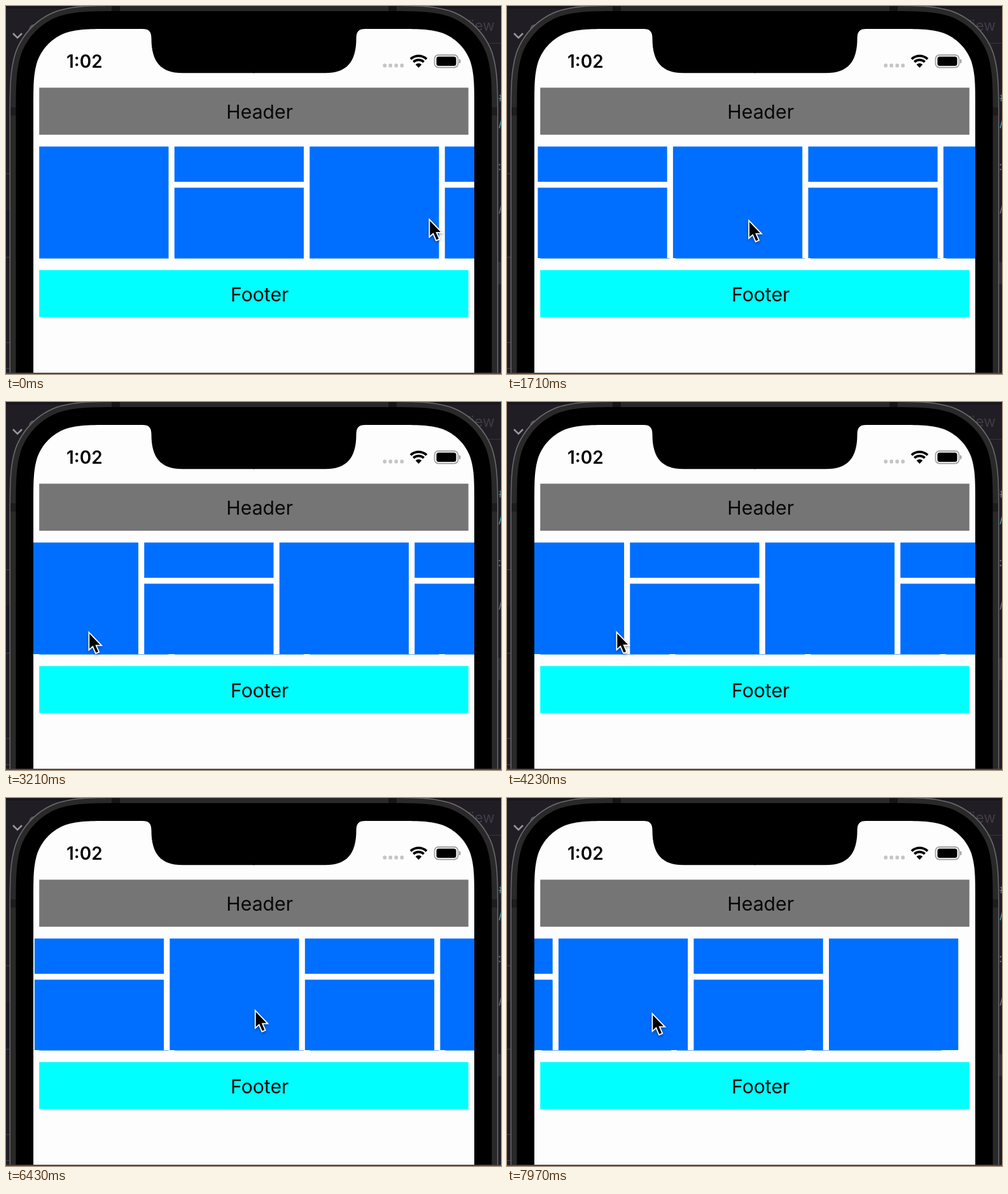
Write an HTML page with a canvas that moves like this. It is 778 px wide and 578 px high and loops after 7.99 s.

```html
<!DOCTYPE html>
<html lang="en">
<head>
<meta charset="utf-8">
<title>Scrolling grid</title>
<style>
  html, body { margin: 0; width: 100%; height: 100%; overflow: hidden; background: #201d25; }
  canvas { display: block; }
</style>
</head>
<body>
<canvas id="stage" width="778" height="578"></canvas>
<script>
const LOOP = 7990;
const BLUE = '#006fff', WHITE = '#fdfdfd', INK = '#080808';
const SANS = 'Inter, Roboto, sans-serif';
const ctx = document.getElementById('stage').getContext('2d');

// Layout in device points, stacked from the header down.
const PT = 693 / 375;
const SCREEN = { left: 43, right: 736, top: 36 };
const GAP = 5 * PT, BAR = 40 * PT, TILE = 110 * PT, COLUMNS = 7;
const LEFT = SCREEN.left + GAP;
const HEADER_TOP = 128.3;
const GRID_TOP = HEADER_TOP + BAR + 2 * GAP;
const GRID_BOTTOM = Math.floor(GRID_TOP + 95 * PT);
const FOOTER_TOP = GRID_TOP + 95 * PT + 2 * GAP;
const SCROLL_END = COLUMNS * (TILE + GAP) + GAP - (SCREEN.right - SCREEN.left);
const BOUNCE_AT = 7650, OVERSHOOT = 44, BOUNCE_DECAY = 348;

// Key poses: time, scroll, pointer x, pointer y
const poses = [
  [0, 0, 664.5, 333.5],
  [660, 0, 612, 331],
  [1110, 111.5, 488, 332],
  [2410, 328.2, 267.5, 342],
  [3210, 472.5, 129.5, 360],
  [3700, 496.5, 109, 366],
  [4050, 496.5, 109, 366],
  [4790, 496.5, 546, 324],
  [5310, 496.5, 573, 332],
  [5560, 496.5, 560, 332],
  [6430, 644.8, 391, 332],
  [BOUNCE_AT, SCROLL_END + OVERSHOOT, 227.5, 337]
];

// Monotone cubic through one column of the poses; holds stay flat.
function sample(time, c) {
  const last = poses.length - 1, t = Math.min(time, BOUNCE_AT);
  const slope = i => (poses[i + 1][c] - poses[i][c]) / (poses[i + 1][0] - poses[i][0]);
  const tangent = i => {
    if (i === 0 || i === last) return 0;
    const a = slope(i - 1), b = slope(i);
    return a * b > 0 ? 2 * a * b / (a + b) : 0;
  };
  let i = 0;
  while (i < last - 1 && t >= poses[i + 1][0]) i++;
  const d = poses[i + 1][0] - poses[i][0], u = (t - poses[i][0]) / d;
  const ease = u * u * (3 - 2 * u);
  return poses[i][c] * (1 - ease) + poses[i + 1][c] * ease
    + d * u * (1 - u) * (tangent(i) * (1 - u) - tangent(i + 1) * u);
}

function scrollAt(t) {
  if (t < BOUNCE_AT) return sample(t, 1);
  return SCROLL_END + OVERSHOOT * Math.exp((BOUNCE_AT - t) / BOUNCE_DECAY);
}

function rect(x, y, w, h, color) {
  ctx.fillStyle = color;
  ctx.fillRect(x, y, w, h);
}

function round(x, y, w, h, r, color) {
  ctx.beginPath();
  ctx.roundRect(x, y, w, h, r);
  ctx.fillStyle = color;
  ctx.fill();
}

function text(str, x, y, size, color, align = 'left', weight = 400) {
  ctx.font = `${weight} ${size}px ${SANS}`;
  ctx.textAlign = align;
  ctx.fillStyle = color;
  ctx.fillText(str, x, y);
}

// Slab running off the bottom, with continuous-curvature top corners.
function slab(left, right, top, r, color) {
  const corner = (x, s) => {
    const curve = (a, b, c, d, e, f) => ctx.bezierCurveTo(
      x + s * a * r, top + b * r, x + s * c * r, top + d * r, x + s * e * r, top + f * r);
    if (s > 0) {
      curve(0, 1.09, 0, 0.87, 0.075, 0.63);
      curve(0.17, 0.37, 0.37, 0.17, 0.63, 0.075);
      curve(0.87, 0, 1.09, 0, 1.53, 0);
    } else {
      curve(1.09, 0, 0.87, 0, 0.63, 0.075);
      curve(0.37, 0.17, 0.17, 0.37, 0.075, 0.63);
      curve(0, 0.87, 0, 1.09, 0, 1.53);
    }
  };
  ctx.beginPath();
  ctx.moveTo(left, 600);
  ctx.lineTo(left, top + 1.53 * r);
  corner(left, 1);
  ctx.lineTo(right - 1.53 * r, top);
  corner(right, -1);
  ctx.lineTo(right, 600);
  ctx.fillStyle = color;
  ctx.fill();
}

function drawDesktop() {
  rect(0, 0, 778, 578, '#201d25');
  rect(0, 0, 778, 4, '#19171c');
  rect(738, 58, 40, 1, '#38343c');
  rect(0, 320, 8, 74, '#1a1820');
  for (const y of [263, 394, 528, 569]) rect(0, y, 8, 1, '#454249');
  rect(770, 402, 8, 35, '#302d34');

  ctx.beginPath();
  ctx.moveTo(11, 43);
  ctx.lineTo(18, 50);
  ctx.lineTo(25, 43);
  ctx.strokeStyle = '#9a979d';
  ctx.lineWidth = 2.5;
  ctx.stroke();
  text('C', 35, 45, 22, '#5a5660');
  text('View', 768, 39, 23, '#403b45', 'right');
  text('#', 774, 150, 19, '#5f8580');
  text('/', 774, 190, 19, '#42a6ad');
  text(':', 773, 258, 19, '#77747a');
  text('/', 774, 324, 19, '#77747a');
}

function drawPhone() {
  slab(5.5, 773.5, -1.5, 118, '#6a6a6a');
  slab(7, 772, 0, 117, '#292929');
  for (const x of [166, 601]) rect(x, 0, 13, 8, '#151515');
  for (const x of [7, 763]) rect(x, 159, 9, 13, '#1d1d1d');
  slab(15.5, 763.5, 8, 108, '#000');
  slab(SCREEN.left, SCREEN.right, SCREEN.top, 44 * PT, WHITE);
  drawNotch();
  drawStatus();
  drawBar('Header', HEADER_TOP, '#757575');
  drawBar('Footer', FOOTER_TOP, '#00ffff');
  rect(0, 576, 778, 2, '#4a474c');
}

function drawBar(label, top, color) {
  rect(LEFT, top, SCREEN.right - GAP - LEFT, BAR, color);
  text(label, 398.7, top + 48.9, 30.2, INK, 'center');
}

function drawNotch() {
  const mid = 389.5;
  ctx.beginPath();
  for (const s of [-1, 1]) {
    ctx.moveTo(mid, 35);
    ctx.lineTo(mid + s * 175, 35);
    ctx.lineTo(mid + s * 175, 36);
    ctx.bezierCurveTo(mid + s * 165, 36, mid + s * 161, 40, mid + s * 161, 51);
    ctx.bezierCurveTo(mid + s * 161, 88, mid + s * 146, 105.3, mid + s * 112, 105.3);
    ctx.lineTo(mid, 105.3);
  }
  ctx.fillStyle = '#000';
  ctx.fill();
  rect(mid - 1, 35, 2, 70.3, '#000');
}

function drawStatus() {
  text('1:02', 95, 97, 28, INK, 'left', 600);
  for (let i = 0; i < 4; i++) round(592.5 + i * 9, 90.5, 5.5, 6, 2, '#c5c5c5');

  // Wi-Fi fan
  const up = Math.PI * 1.5, half = 0.76;
  ctx.strokeStyle = ctx.fillStyle = '#000';
  ctx.lineWidth = 3.8;
  for (const r of [18.2, 11.8]) {
    ctx.beginPath();
    ctx.arc(648.5, 96.5, r, up - half, up + half);
    ctx.stroke();
  }
  ctx.beginPath();
  ctx.moveTo(648.5, 97);
  ctx.arc(648.5, 97, 7, up - half, up + half);
  ctx.fill();

  // Battery
  ctx.beginPath();
  ctx.roundRect(673.5, 77, 37, 19.5, 6);
  ctx.strokeStyle = '#a3a3a3';
  ctx.lineWidth = 1.8;
  ctx.stroke();
  round(676.5, 79.5, 31, 14.5, 3.5, '#000');
  round(712, 83.5, 2.5, 6.5, [0, 2, 2, 0], '#a3a3a3');
}

function eachColumn(offset, draw) {
  for (let i = 0; i < COLUMNS; i++) draw(LEFT + i * (TILE + GAP) - offset, i);
}

// Columns alternate between one tall tile and two stacked ones.
function drawGrid(t) {
  ctx.save();
  ctx.beginPath();
  ctx.rect(SCREEN.left, GRID_TOP - 5, SCREEN.right - SCREEN.left, 190);
  ctx.clip();
  eachColumn(scrollAt(t), (x, i) => {
    rect(x, GRID_TOP, TILE, GRID_BOTTOM - GRID_TOP, BLUE);
    if (i % 2) rect(x - 1, GRID_TOP + 30 * PT, TILE + 2, GAP, WHITE);
  });
  // The bottom hairline lags behind the tiles.
  const stale = t < BOUNCE_AT ? 0 : SCROLL_END + OVERSHOOT;
  eachColumn(stale, x => rect(x, GRID_BOTTOM, TILE, 1, '#6cabff'));
  ctx.restore();
}

function drawPointer(t) {
  const outline = new Path2D('M1.8 4V27.5L7.2 22.6L12 33.8L15.6 32.3L10.9 21.4H18.6Z');
  ctx.save();
  ctx.translate(sample(t, 2), sample(t, 3));
  ctx.shadowColor = 'rgba(0,0,0,.4)';
  ctx.shadowBlur = 4;
  ctx.shadowOffsetY = 2;
  ctx.strokeStyle = '#fff';
  ctx.lineWidth = 3.6;
  ctx.stroke(outline);
  ctx.shadowColor = 'transparent';
  ctx.fillStyle = '#000';
  ctx.fill(outline);
  ctx.restore();
}

function frame() {
  const t = performance.now() % LOOP;
  drawDesktop();
  drawPhone();
  drawGrid(t);
  drawPointer(t);
  requestAnimationFrame(frame);
}
frame();
</script>
</body>
</html>
```
